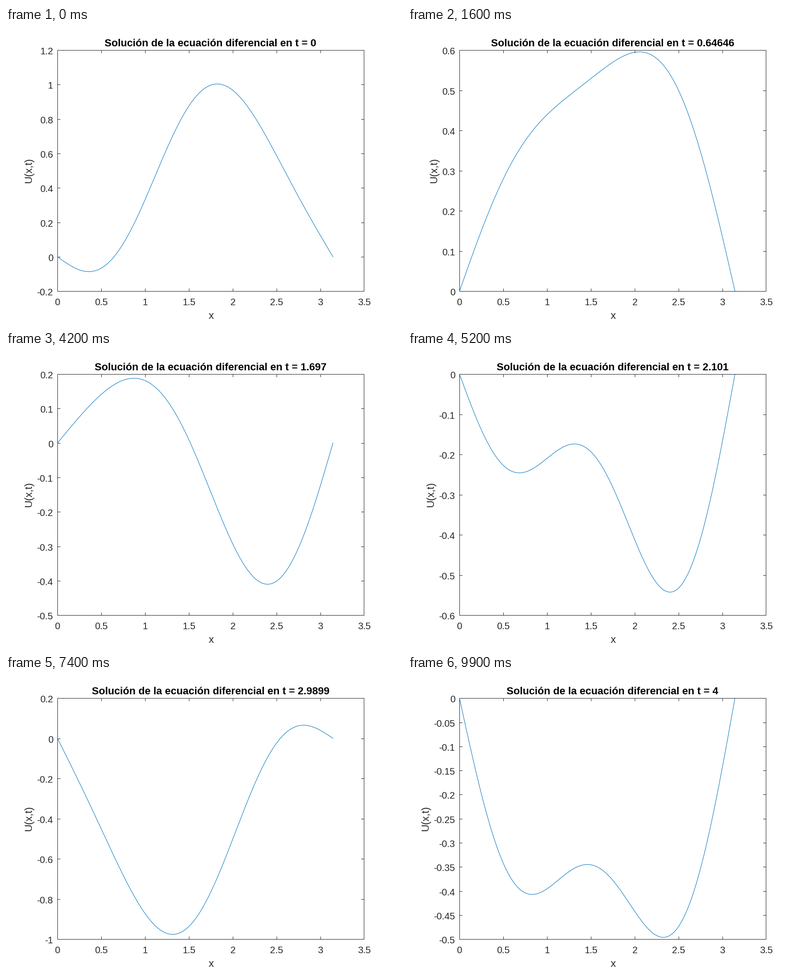
Recreate the animation shown at these times as a matplotlib script. Size 840 px wide and 630 px high, loop 10000 ms.

```python
import numpy as np
import matplotlib.pyplot as plt
from matplotlib.animation import FuncAnimation

W, H, DPI = 840, 630, 120
PX = 72 / DPI  # points per pixel
FRAMES = 100
LEFT, RIGHT, BOTTOM, TOP = 109.2, 760.2, 69.8, 582.8  # axes box, y upwards
INK = "#262626"

plt.rcParams["font.family"] = "Liberation Sans"
plt.rcParams["axes.unicode_minus"] = False

# Vibrating string on [0, pi]: u = sum a_n cos(nt) sin(nx)
MODES = np.array([1, 2, 3])
AMPS = np.array([0.7555, -0.3067, -0.1704])
x = np.linspace(0, np.pi, 200)
SHAPES = np.sin(np.outer(MODES, x))


def wave(t):
    return (AMPS * np.cos(MODES * t)) @ SHAPES


def nice_ticks(lo, hi):
    """Smallest 1-2-5 step that covers the data in at most ten intervals."""
    for power in (-2, -1, 0):
        for m in (1, 2, 5):
            step = m * 10.0 ** power
            first = int(np.floor(lo / step + 1e-9))
            last = int(np.ceil(hi / step - 1e-9))
            if last - first <= 10:
                return [k * step for k in range(first, last + 1)]


def advance(s):
    """Width of a number in whole pixels at the tick label size."""
    return sum({".": 6, "-": 7}.get(c, 11) for c in s)


fig = plt.figure(figsize=(W / DPI, H / DPI), dpi=DPI, facecolor="white")


def label(px, py, s="", size=20, ha="center", **kw):
    kw.setdefault("color", INK)
    return fig.text(px / W, 1 - py / H, s, fontsize=size * PX, ha=ha,
                    va="baseline", **kw)


ax = fig.add_axes([LEFT / W, BOTTOM / H, (RIGHT - LEFT) / W, (TOP - BOTTOM) / H])
ax.set_facecolor("white")
x_ticks = nice_ticks(0, np.pi)
x_max = x_ticks[-1]
ax.set_xlim(0, x_max)

# The right edge is drawn on the last pixel inside the box
ax.spines["right"].set_position(("outward", -PX))
for side in ("top", "bottom"):
    ax.spines[side].set_bounds(0, x_max * (1 - 1 / (RIGHT - LEFT)))
for spine in ax.spines.values():
    spine.set(linewidth=PX, edgecolor=INK)
ax.set_xticks(x_ticks[:-1])
ax.tick_params(direction="in", length=6 * PX, width=PX, color=INK,
               top=True, right=True, labelbottom=False, labelleft=False)

for v in x_ticks:
    name = f"{v:g}"
    mid = LEFT + (RIGHT - LEFT) * v / x_max
    label(mid - advance(name) / 2, 590, name, ha="left")

label(435, 619, "x", 22)
y_name = label(55, 303, "U(x,t)", 22, rotation=90, rotation_mode="anchor")
title = label(434, 39, size=22, weight="bold", color="black")
y_labels = [label(0, 0, ha="left") for _ in range(11)]
curve, = ax.plot([], [], color="#0072BD", linewidth=PX)


def draw(i):
    t = 4 * i / (FRAMES - 1)
    u = wave(t)
    curve.set_data(x, u)
    title.set_text(f"Solución de la ecuación diferencial en t = {t:.5g}")

    ticks = nice_ticks(u.min(), u.max())
    lo, hi = ticks[0], ticks[-1]
    ax.set_ylim(lo, hi)
    ax.set_yticks(ticks)
    names = [f"{v:g}" for v in ticks]
    for k, text in enumerate(y_labels):
        text.set_visible(k < len(ticks))
        if k < len(ticks):
            y = BOTTOM + (TOP - BOTTOM) * (ticks[k] - lo) / (hi - lo)
            text.set_text(names[k])
            text.set_position(((100 - advance(names[k])) / W, (y - 9) / H))
    y_name.set_x((89 - max(map(advance, names))) / W)
    return [curve, title, y_name, *y_labels]


anim = FuncAnimation(fig, draw, frames=FRAMES, interval=100, repeat=True,
                     repeat_delay=0, blit=False)
plt.show()
```
